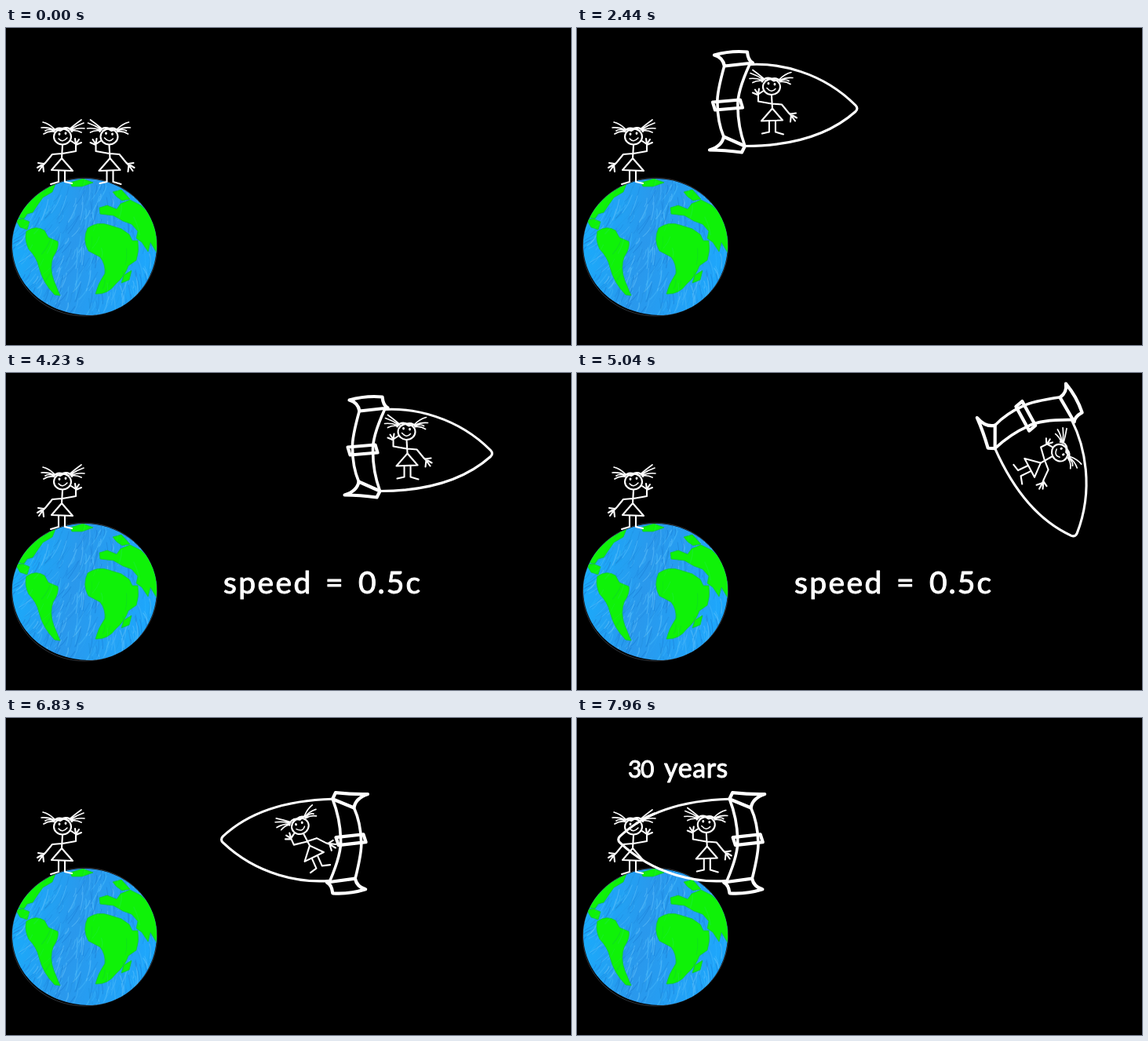
These frames come from a looping animation (720x404 px, 8 s). An HTML page:

```html
<!DOCTYPE html>
<html lang="en">
<head>
<meta charset="utf-8">
<title>Twins and a rocket</title>
<style>
html, body { margin: 0; width: 100%; height: 100%; overflow: hidden; background: #000; }
svg { display: block; width: 100vw; height: 100vh; }
.ink { fill: none; stroke: #fff; stroke-width: 2.1; stroke-linecap: round; stroke-linejoin: round; }
.land { fill: #0ff208; stroke: #14c43a; stroke-width: .8; stroke-linejoin: round; }
text { font-family: Lato, "Open Sans", sans-serif; fill: #fff; stroke: #fff; stroke-width: 1; stroke-linejoin: round; }
</style>
</head>
<body>
<svg viewBox="0 0 720 404">
  <defs>
    <clipPath id="disc"><path d="M100 192C150 192 192 230 192 276C192 327 152 366 106 366C50 365 8 327 8 276C8 230 50 192 100 192Z"/></clipPath>
    <linearGradient id="sea" x2="1" y2=".2">
      <stop offset="0" stop-color="#16b0ff"/>
      <stop offset=".5" stop-color="#2a98ec"/>
      <stop offset="1" stop-color="#1ea6fb"/>
    </linearGradient>
    <g id="girl" class="ink">
      <ellipse cx="0" cy="-21.5" rx="11" ry="10"/>
      <path d="M-11-28Q-8-34 0-32Q8-35 12-28M-9-31L-3-29L2-32L8-29"/>
      <path stroke-width="1.7" d="M-10-31Q-17-38-25-40M-11-30Q-18-34-27-33M-12-28Q-18-29-24-25M-11-29Q-18-32-22-29M10-32Q17-38 24-43M11-31Q18-36 27-39M12-30Q20-33 28-32M12-29Q18-30 24-27"/>
      <path stroke-width="2.8" d="M-4-25v.6M4-26v.6"/>
      <path stroke-width="1.5" d="M-5-19Q0-13 6-20"/>
      <path d="M0-11L-1 6M-1 0L-13 1L-22 12L-26 16M-22 12L-32 18M-25 15L-30 22M-25 14L-24 23M-24 13L-31 12M0 0L17-3L17-14M17-12L11-16M17-12L16-19M17-12L21-18M17-11L24-14"/>
      <path d="M-1 6L-14 21L13 22Z"/>
      <path d="M-5 22L-5 36L-15 39M3 22L3 36L12 38"/>
    </g>
  </defs>
  <g id="earth">
    <ellipse cx="100" cy="279" rx="92.5" ry="88" fill="#000" stroke="#30343a" stroke-width="1"/>
    <g clip-path="url(#disc)">
      <rect x="5" y="190" width="190" height="180" fill="url(#sea)"/>
      <g id="hatch" fill="none" stroke-linecap="round"></g>
      <g class="land">
        <path d="M63 199L59 209L47 216L40 226L34 235L27 237L23 243L12 241L30 205Z"/>
        <path d="M12 244L21 243L30 247L27 257L18 254Z"/>
        <path d="M82 197L98 192L111 197L97 202L84 202Z"/>
        <path d="M26 259Q38 251 49 258L54 267L66 272Q68 280 60 292Q55 306 61 322L69 341L62 340Q47 325 42 305Q39 292 29 282Q23 270 26 259Z"/>
        <path d="M136 209L147 206L158 218L148 220L141 215Z"/>
        <path d="M119 229L129 226L141 231L146 224L158 219L172 226L196 250L193 288L184 273L181 285L173 273L166 268L168 259L160 250L149 246L137 239L120 237Z"/>
        <path d="M104 255Q117 246 131 251L147 256L157 263L161 271L168 271Q170 284 166 296L156 303Q151 317 140 326Q130 340 114 339Q117 326 126 313Q127 301 120 292L105 284Q97 270 104 255Z"/>
        <path d="M160 309L157 321L147 325L150 315Z"/>
      </g>
      <g id="shade" fill="none" stroke-linecap="round"></g>
    </g>
  </g>
  <use href="#girl" x="72" y="160"/>
  <use id="twin" href="#girl" transform="translate(131.5 160) scale(-1 1)"/>
  <g id="ship" class="ink">
    <path stroke-width="3.1" d="M-42-47C-5-49 50-38 93 5Q97 9 93 13C57 45 5 57-48 57"/>
    <path stroke-width="3.6" d="M-74-46Q-84-10-83 2Q-83 26-75 45M-42-47Q-58-12-57 6Q-57 32-48 57"/>
    <path stroke-width="4.2" d="M-87-59Q-66-65-45-63Q-44-52-38-49L-74-45Q-76-56-87-59Z"/>
    <path stroke-width="4.2" d="M-93 62Q-77 57-75 45L-48 57L-52 65Q-74 62-93 62Z"/>
    <path stroke-width="4.2" d="M-89 1L-54-2L-51 8L-86 11Z"/>
  </g>
  <use id="rider" href="#girl"/>
  <g id="speed" font-size="39">
    <text x="277" y="281" letter-spacing="2.4">speed</text>
    <text x="407" y="281">=</text>
    <text x="449" y="281" letter-spacing="2">0.5c</text>
  </g>
  <g id="years">
    <text x="65" y="76" font-size="30" letter-spacing="-1.5">30</text>
    <text x="111" y="76" font-size="34" letter-spacing=".6">years</text>
  </g>
</svg>
<script>
const $ = id => document.getElementById(id);
const LOOP = 8000, LAUNCH = 1540, TURN = 4650, BACK = 5780;

let seed = 11;
const rand = () => (seed = seed * 16807 % 2147483647) / 2147483647;

// Crayon strokes that fan out from the top of the globe
function crayon(group, count, colors, opacity) {
  let out = '';
  for (let i = 0; i < count; i++) {
    const x = 8 + rand() * 184, y = 190 + rand() * 178;
    const a = 1.9 - (x - 100) * 0.006 + (rand() - 0.5) * 0.7, len = 8 + rand() * 20;
    const dx = Math.cos(a) * len, dy = Math.sin(a) * len;
    out += `<path d="M${x.toFixed(1)} ${y.toFixed(1)}q${(dx / 2 + 2).toFixed(1)} ${(dy / 2).toFixed(1)} ${dx.toFixed(1)} ${dy.toFixed(1)}" ` +
      `stroke="${colors[i % colors.length]}" stroke-width="${(0.6 + rand()).toFixed(1)}" opacity="${opacity}"/>`;
  }
  group.innerHTML = out;
}
crayon($('hatch'), 420, ['#5fc0fa', '#1b7ed6', '#3eb2f8', '#228de2'], 0.55);
crayon($('shade'), 90, ['#0b6f9a', '#55d8ff'], 0.1);

const clamp = v => Math.max(0, Math.min(1, v));
const ramp = (t, from, to) => clamp((t - from) / (to - from));

function keys(t, list) {
  let v = list[0][1];
  for (let i = 1; i < list.length; i++) {
    const [a, p] = list[i - 1], [b, q] = list[i];
    if (t >= a) v = p + (q - p) * ramp(t, a, b);
  }
  return v;
}

function shipX(t) {
  if (t < TURN) return 586 + (t - TURN) * 0.1467;
  if (t > BACK) return 576 - (t - BACK) * 0.1963;
  const u = ramp(t, TURN, BACK), w = 1 - u;
  return 586 * w * w * (1 + 2 * u) + 576 * u * u * (3 - 2 * u) + 83 * u * w * w + 111 * u * u * w;
}

function draw(t) {
  const flying = t >= LAUNCH;
  $('twin').style.display = flying ? 'none' : '';
  $('ship').style.display = $('rider').style.display = flying ? '' : 'none';

  const x = shipX(t), y = keys(t, [[TURN, 93.5], [BACK, 161.5]]);
  const tilt = keys(t, [[TURN, 0], [5040, 66], [BACK, 178.5]]);
  const spin = keys(t, [[TURN, 0], [5040, 64], [6180, 242], [6830, 336], [7000, 360]]);
  const r = tilt * Math.PI / 180;
  const gx = x - 14 * Math.cos(r) - 3 * Math.sin(r) + 3 * ramp(t, 6830, 7100);
  const gy = keys(t, [[TURN, 96.5], [5040, 111], [BACK, 157.5]]);
  $('ship').setAttribute('transform', `translate(${x} ${y}) rotate(${tilt})`);
  $('rider').setAttribute('transform', `translate(${gx} ${gy}) rotate(${spin}) scale(-1 1)`);

  $('speed').style.opacity = ramp(t, 3080, 3560) * (1 - ramp(t, 6140, 6640));
  $('years').style.opacity = ramp(t, 6950, 7450);
}

const start = performance.now();
function tick() {
  draw((performance.now() - start) % LOOP);
  requestAnimationFrame(tick);
}
tick();
</script>
</body>
</html>
```
